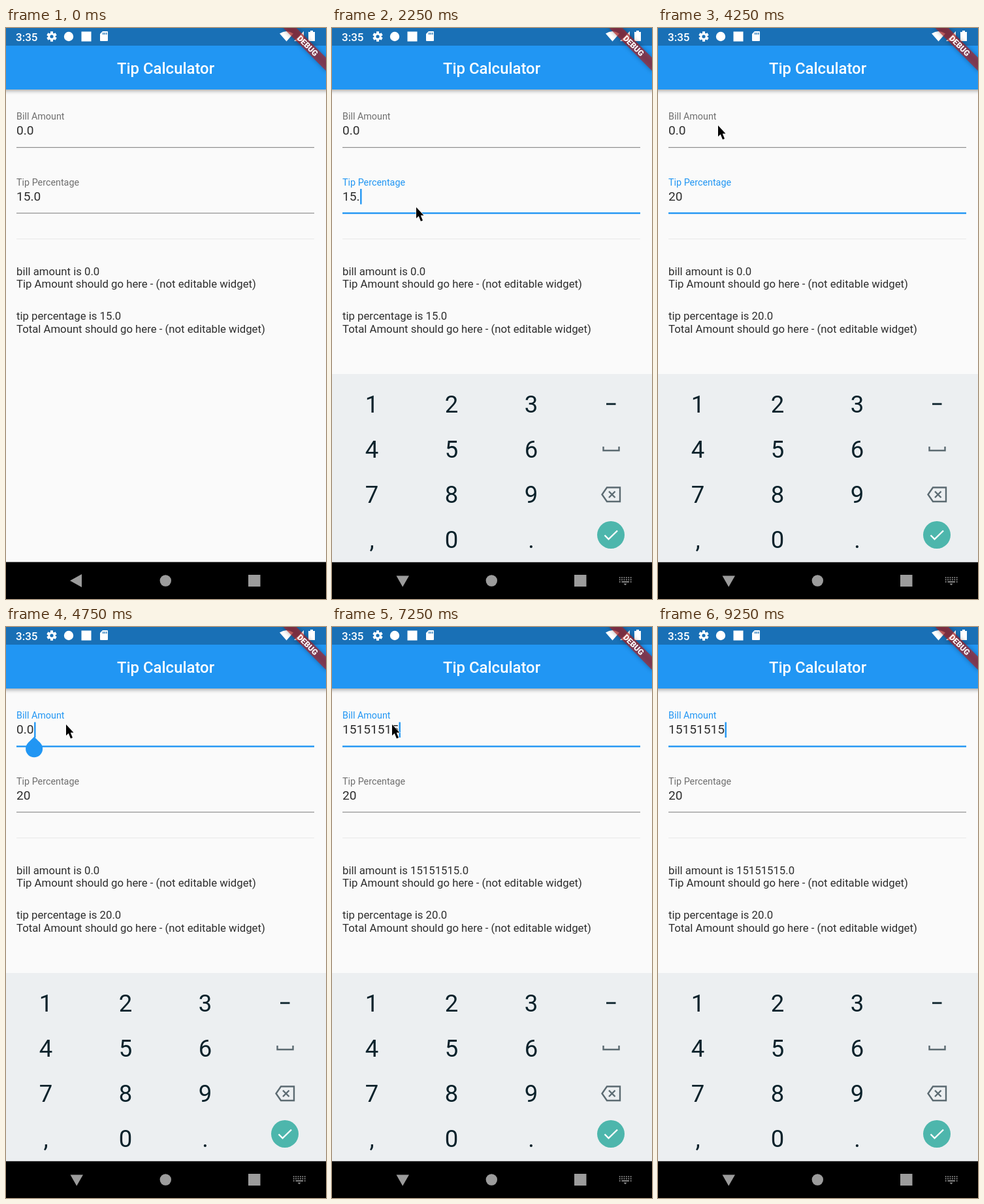
Write an HTML page with a canvas that moves like this. It is 490 px wide and 873 px high and loops after 9500 ms.

```html
<!DOCTYPE html>
<html lang="en">
<head>
<meta charset="utf-8">
<title>Tip Calculator</title>
<style>
html, body { margin: 0; width: 100%; height: 100%; overflow: hidden; background: #fafafa; }
canvas { display: block; }
</style>
</head>
<body>
<canvas id="stage" width="490" height="873"></canvas>
<script>
const ctx = document.getElementById('stage').getContext('2d');
const LOOP = 9500, STEP = 250;
const BLUE = '#2196f3', INK = 'rgba(0,0,0,.82)', MUTED = 'rgba(0,0,0,.56)';
const SMALL = 14.34, BODY = 16.74, INPUT = 19.12, TITLE = 23.9;

// [time, value] lists
const tipTyping = [[0, '15.0'], [2250, '15.'], [2500, '1'], [2750, ''], [3250, '2'], [3500, '20']];
const billTyping = [[0, '0.0'], [5000, '0'], [5250, ''], [6500, '15'], [6750, '1515'],
  [7000, '151515'], [7250, '15151515']];
const focusChanges = [[0, ''], [1000, 'tip'], [4500, 'bill']];
// [time, x, y]
const pointerPath = [[0, 520, 335], [250, 440, 322], [750, 129, 274], [3500, 129, 274], [3750, 120, 180],
  [4000, 100, 82], [4250, 92, 149], [7250, 92, 149], [8000, 500, 330]];

const clamp = v => Math.max(0, Math.min(1, v));
const latest = (list, t) => list.filter(e => e[0] <= t).pop();

function text(str, x, y, size, color = INK, weight = 400, align = 'left') {
  ctx.font = `${weight} ${size}px Roboto, sans-serif`;
  ctx.textAlign = align;
  ctx.fillStyle = color;
  ctx.fillText(str, x, y);
}
function rect(x, y, w, h, color) {
  ctx.fillStyle = color;
  ctx.fillRect(x, y, w, h);
}
function circle(x, y, r, color) {
  ctx.fillStyle = color;
  ctx.beginPath();
  ctx.arc(x, y, r, 0, 7);
  ctx.fill();
}
function fill(d, color) {
  ctx.fillStyle = color;
  ctx.fill(new Path2D(d));
}
function stroke(d, color, width) {
  ctx.strokeStyle = color;
  ctx.lineWidth = width;
  ctx.stroke(new Path2D(d));
}

function appBar() {
  ctx.save();
  ctx.shadowColor = 'rgba(0,0,0,.36)';
  ctx.shadowBlur = 6;
  ctx.shadowOffsetY = 2;
  rect(-10, 0, 510, 94, BLUE);
  ctx.restore();
  rect(0, 0, 490, 27, '#1970b6');
  text('Tip Calculator', 244.5, 70, TITLE, '#fff', 500, 'center');
}

function debugBanner() {
  ctx.save();
  ctx.translate(490.5, -1.5);
  ctx.rotate(Math.PI / 4);
  ctx.shadowColor = 'rgba(0,0,0,.5)';
  ctx.shadowBlur = 7;
  rect(-48, 33.4, 96, 14.3, 'rgba(183,28,28,.63)');
  ctx.shadowColor = 'transparent';
  text('DEBUG', 0, 44.8, 12.2, '#fff', 900, 'center');
  ctx.restore();
}

function statusIcons() {
  text('3:35', 15, 19.5, 17, '#fff', 500);
  ctx.save();
  ctx.translate(70, 13);
  for (let i = 0; i < 6; i++) {
    rect(-2, -7.5, 4, 15, '#fff');
    ctx.rotate(Math.PI / 3);
  }
  circle(0, 0, 5.6, '#fff');
  circle(0, 0, 2.6, '#1970b6');
  ctx.restore();
  circle(96, 13, 7.2, '#fff');
  rect(115.5, 5.5, 15, 15, '#fff');
  fill('M148 5h7q1 0 1 1v13q0 1-1 1h-10q-1 0-1-1V9z', '#fff');
  for (const x of [148, 150.6, 153.2]) rect(x, 7, 1.3, 3.2, '#1970b6');
  fill('M419 8.5Q429.5 1.5 440 8.5L429.5 20.5z', '#fff');
  fill('M456 5V20H441z', '#fff');
  fill('M466 4h4v2h3v14h-10V6h3z', '#fff');
}

function field({ label, value, hint, hintAlpha, y, focused, caret, handle }) {
  text(label, 16, y, SMALL, focused ? BLUE : MUTED);
  if (hintAlpha) text(hint, 16, y + 23.2, INPUT, `rgba(0,0,0,${.56 * hintAlpha})`);
  text(value, 16, y + 23.2, INPUT);
  const caretX = 16.6 + ctx.measureText(value).width;
  if (focused) rect(16, y + 41.4, 456, 2.4, BLUE);
  else rect(16, y + 42, 456, 1.2, 'rgba(0,0,0,.44)');
  if (focused && caret) rect(caretX, y + 5.5, 2.4, 23.5, BLUE);
  if (focused && handle) {
    ctx.save();
    ctx.translate(caretX, y + 46.2);
    ctx.rotate(Math.PI / 4);
    circle(0, 0, 13, BLUE);
    rect(-13, -13, 13, 13, BLUE);
    ctx.restore();
  }
}

function summary(tip, bill) {
  const decimal = s => (parseFloat(s) || 0).toFixed(1);
  rect(16, 322, 456, 1, '#e9e9e9');
  text('bill amount is ' + decimal(bill), 16, 377.5, BODY);
  text('Tip Amount should go here - (not editable widget)', 16, 397, BODY);
  text('tip percentage is ' + decimal(tip), 16, 446, BODY);
  text('Total Amount should go here - (not editable widget)', 16, 465.5, BODY);
}

function navBar(keyboardOpen) {
  const grey = '#9c9c9c';
  rect(0, 816.5, 490, 57, '#000');
  fill(keyboardOpen ? 'M98.5 837.5H118L108.2 854.5z' : 'M98 845L116 835v20z', grey);
  circle(244.3, 845, 8.7, grey);
  rect(371, 836, 18.5, 18, grey);
  if (!keyboardOpen) return;
  for (let row = 0; row < 3; row++)
    for (let col = 0; col < 6; col++)
      if (row < 2 || col === 0 || col === 5)
        rect(439.8 + col * 3.4, 839.5 + row * 3.2, 1.7, 1.7, grey);
  rect(443.5, 845.9, 11.5, 1.7, grey);
  fill('M446.5 849.5h5l-2.5 2.6z', grey);
}

function keyboard(t) {
  const rest = 1 - clamp((t - 1080) / 200);
  if (rest === 1) return;
  const dark = '#0b222b', grey = '#5b6a71';
  ctx.save();
  ctx.globalAlpha = 1 - rest ** 2;
  ctx.translate(0, 600 * rest ** 3);
  rect(0, 529, 490, 287.5, '#eceff1');
  ['123', '456', '789', ',0.'].forEach((row, r) =>
    [...row].forEach((key, c) => text(key, 61 + c * 122, 588 + r * 69.1, 36.5, dark, 400, 'center')));
  rect(420, 573.5, 14.5, 2.8, dark);
  stroke('M415.5 640v6h24V640', grey, 2.4);
  stroke('M421 702.5h20V724H421L413.5 713.2z', grey, 2.4);
  stroke('M424 708.5l9.5 9.5m0-9.5l-9.5 9.5', grey, 2.4);
  circle(427, 775, 21, '#4db6ac');
  stroke('M417.5 775.5l6 6L437 768.5', '#fff', 2.4);
  ctx.restore();
}

function pointer(t) {
  const next = pointerPath.find(p => p[0] > t);
  if (!next) return;
  const from = latest(pointerPath, t);
  const k = (t - from[0]) / (next[0] - from[0]);
  ctx.save();
  ctx.translate(from[1] + (next[1] - from[1]) * k, from[2] + (next[2] - from[2]) * k);
  const arrow = 'M0 0V17L3.7 13.6 7 21.5 10 20.2 6.8 12.5H11.5z';
  stroke(arrow, '#fff', 1.2);
  fill(arrow, '#000');
  ctx.restore();
}

function draw(t) {
  const [tipTime, tip] = latest(tipTyping, t);
  const [billTime, bill] = latest(billTyping, t);
  const [focusTime, focus] = latest(focusChanges, t);
  const lastKey = focus === 'tip' ? tipTime : billTime;
  const caret = Math.floor((t - Math.max(focusTime, lastKey)) / 500) % 2 === 0;
  const handle = lastKey < focusTime;

  rect(0, 0, 490, 873, '#fafafa');
  appBar();
  statusIcons();
  debugBanner();
  summary(tip, bill);
  field({ label: 'Bill Amount', value: bill, hint: 'Enter the Bill Amount', y: 140,
    hintAlpha: bill ? 0 : clamp((t - 5125) / 375), focused: focus === 'bill', caret, handle });
  field({ label: 'Tip Percentage', value: tip, hint: 'Enter the Tip Percentage', y: 240.5,
    hintAlpha: tip === '' ? 1 : tip === '2' ? .12 : 0, focused: focus === 'tip', caret, handle });
  navBar(t > 1080);
  keyboard(t);
  pointer(t);
}

function tick() {
  draw(Math.floor(performance.now() % LOOP / STEP) * STEP);
  requestAnimationFrame(tick);
}
tick();
</script>
</body>
</html>
```
